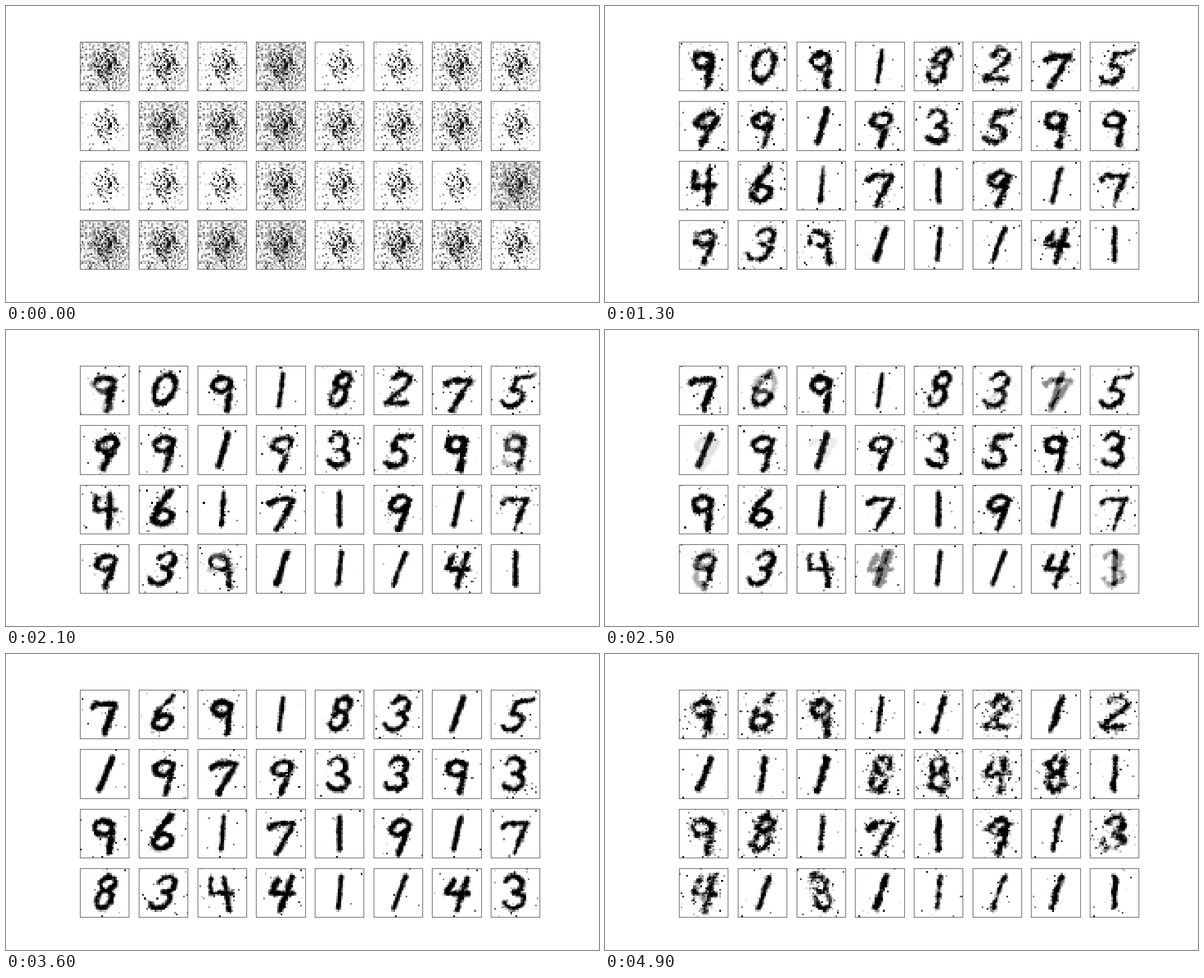
These frames come from a looping animation (1058 px wide and 529 px high, 5 s). A matplotlib script:

```python
import numpy as np
import matplotlib.pyplot as plt
from matplotlib.animation import FuncAnimation

ROWS, COLS, N = 4, 8, 28
EPOCHS = 50
# Snapshots play in alphabetical order: 0, 1, 10, 11, ... 19, 2, 20, ...
ORDER = sorted(range(EPOCHS), key=str)
KEYS = [9, 20, 36]

# Each tile: its digit at the key epochs, and its slant
TILES = [
    ("997", .05), ("606", .3), ("999", 0), ("111", .14),
    ("188", .3), ("223", .3), ("171", .36), ("255", .35),
    ("191", .42), ("199", .15), ("117", .3), ("899", .25),
    ("833", 0), ("453", .15), ("899", .1), ("193", .05),
    ("949", 0), ("866", .25), ("111", .08), ("777", .25),
    ("111", 0), ("999", .25), ("111", .23), ("377", .12),
    ("498", .25), ("133", .35), ("894", -.2), ("114", .33),
    ("111", .1), ("111", .38), ("144", .3), ("113", 0),
]

Y, X = np.mgrid[:N, :N] + 0.5


def arc(cx, cy, rx, ry, start=0, end=360):
    a = np.radians(np.linspace(start, end, 14))
    return list(zip(cx + rx * np.cos(a), cy + ry * np.sin(a)))


# Pen strokes in pixel units of a tile
GLYPHS = {
    "0": [arc(14, 13.5, 5.5, 8.5)],
    "1": [[(14, 5), (14, 23)]],
    "2": [arc(13.5, 9, 4.8, 4, 200, 400) + [(8.5, 21.5), (20, 21.5)]],
    "3": [arc(13, 9.5, 4.7, 4.5, 200, 450), arc(13, 18.5, 5.5, 4.5, 270, 520)],
    "4": [[(9.5, 7), (8, 14.5), (20, 14.5)], [(17, 5.5), (16.5, 24)]],
    "5": [[(20, 6), (11.5, 7.5), (11, 13.5)]
          + arc(13, 18.5, 5.5, 4.8, 250, 510)],
    "6": [[(15.5, 4), (9.5, 14)], arc(14, 18.5, 5, 4)],
    "7": [[(6.5, 10.5), (9, 8.5), (19.5, 8.5), (17.5, 15), (14.5, 25)]],
    "8": [arc(14, 9, 4, 4), arc(14, 18, 4, 5)],
    "9": [arc(13.5, 11, 5, 4), [(18.5, 9), (17.8, 16), (16.5, 25)]],
}


def segment_distance(a, b):
    (ax, ay), (bx, by) = a, b
    dx, dy = bx - ax, by - ay
    t = np.clip(((X - ax) * dx + (Y - ay) * dy) / (dx * dx + dy * dy), 0, 1)
    return np.hypot(X - ax - t * dx, Y - ay - t * dy)


def glyph_distance(digit, slant):
    def place(p):
        return p[0] + slant * (16 - p[1]), p[1]

    return np.min([segment_distance(place(a), place(b))
                   for stroke in GLYPHS[digit]
                   for a, b in zip(stroke, stroke[1:])], axis=0)


def blotches(rng, shape):
    """Noise averaged over neighbouring pixels, with unit spread."""
    z = rng.normal(size=shape)
    for axis in (1, 2):
        z = z + np.roll(z, 1, axis) + np.roll(z, -1, axis)
    return z / 3


def smooth(f):
    f = np.clip(f, 0, 1)
    return f * f * (3 - 2 * f)


def per_tile(values):
    return np.asarray(values, float)[..., None, None]


DIST = np.array([[glyph_distance(digits[k], slant) for digits, slant in TILES]
                 for k in range(len(KEYS))])
MESS = per_tile([[0.2 if digits[k] == "1" else 1 for digits, _ in TILES]
                 for k in range(len(KEYS))])
SHAPE = DIST.shape[1:]

base = np.random.default_rng(4)
PEN = per_tile(base.uniform(1.2, 1.7, len(TILES)))
DELAY = per_tile(base.uniform(-0.6, 0.6, len(TILES)))
HAZE = per_tile(base.permutation(np.linspace(0, 1, len(TILES))))
WOBBLE = blotches(base, SHAPE)

# Shared pattern of the untrained network
BLOB = np.exp(-((X - 14.4) / 8.5) ** 2 - ((Y - 13.5) / 9.5) ** 2)
RAW = (0.35 * BLOB + (0.2 + 0.08 * BLOB) * base.normal(size=(N, N))
       + 0.2 * np.exp(-glyph_distance("9", 0.2) / 1.5) * BLOB)


def untrained(haze):
    floor = 0.38 - 0.53 * haze
    return np.clip((RAW - floor) * (2.2 - 1.2 * haze), 0, 1)


def tiles(epoch):
    rng = np.random.default_rng(1000 + epoch)
    pos = np.interp(epoch, KEYS, range(len(KEYS)))
    k = min(int(pos), len(KEYS) - 2)
    f = smooth(4 * (pos - k) - 2.2 + DELAY)
    early = np.exp(-epoch / 14)

    def mix(a):
        return (1 - f) * a[k] + f * a[k + 1]

    # Strokes start out soft and ragged, then sharpen
    ragged = ((0.25 + 1.1 * early) * (WOBBLE + blotches(rng, SHAPE)) / 1.4
              + (0.15 + 0.3 * early) * rng.normal(size=SHAPE))
    edge = PEN - DIST + ragged * (0.35 + 0.65 * MESS)
    ink = mix(np.clip(0.5 + edge / (1.2 + 2 * early * MESS), 0, 1))

    # Loose specks, denser around the strokes
    rate = (0.22 + 1.2 * early) * mix(MESS)
    odds = rate * (0.05 + 0.25 * np.exp(-mix(DIST) / 2.5))
    specks = (rng.random(SHAPE) < odds) * rng.random(SHAPE) ** 2

    # A few spots appear at the same place in many tiles
    for x, y in rng.integers(0, N, (3, 2)):
        border = rng.choice([0, 1, N - 1])
        specks[:, border, x] += (rng.random(len(TILES)) < 0.35) * 0.9
        specks[:, y, x] += (rng.random(len(TILES)) < 0.2) * 0.5

    learned = min(epoch / 9, 1)
    start = untrained(HAZE * (1 - learned)) * (1 - learned)
    digits = np.maximum(ink, specks) * learned ** 0.6
    return np.clip(np.maximum(digits, start), 0, 1)


fig, axes = plt.subplots(ROWS, COLS, figsize=(10.58, 5.29), dpi=100)
images = []
for ax in axes.flat:
    images.append(ax.imshow(np.zeros((N, N)), cmap="gray_r", vmin=0, vmax=1,
                            interpolation="nearest"))
    ax.set(xticks=[], yticks=[])
    for spine in ax.spines.values():
        spine.set(linewidth=0.75, edgecolor="0.3")


def update(i):
    for image, data in zip(images, tiles(ORDER[i])):
        image.set_data(data)
    return images


anim = FuncAnimation(fig, update, frames=EPOCHS, interval=100, repeat=True,
                     repeat_delay=0, init_func=lambda: update(0))
plt.show()
```
